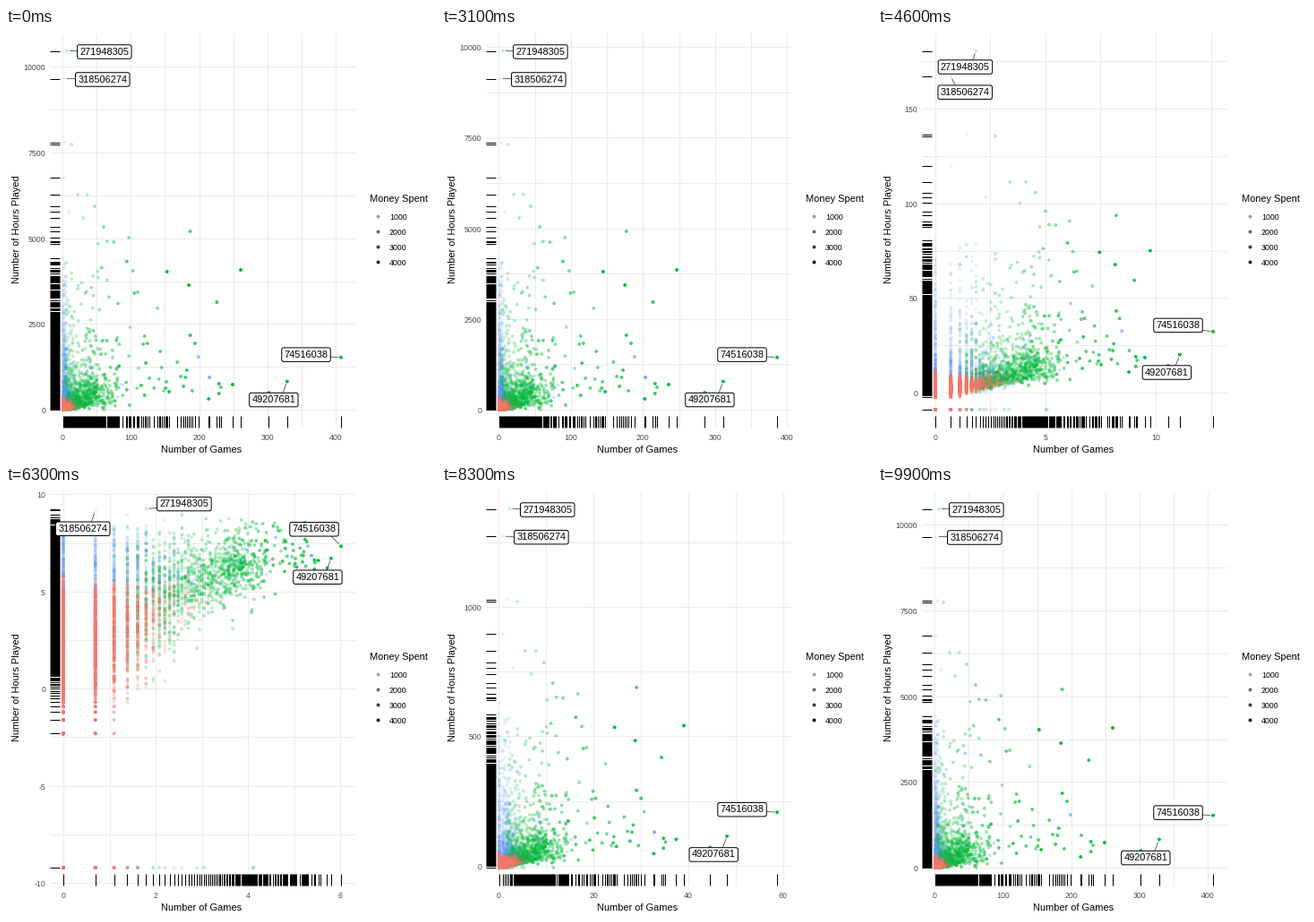
Animation, 480 px wide and 480 px high, one loop 10000 ms. Source, as a matplotlib script:

```python
import math

import matplotlib.pyplot as plt
import numpy as np
from matplotlib.animation import FuncAnimation
from matplotlib.collections import LineCollection

SIZE, FRAMES, STEP_MS = 480, 100, 100
PX = 0.75  # points per pixel at 96 dpi
LEFT, RIGHT, TOP, BOTTOM = 48.5, 389.5, 5.5, 446
PAD_X = (RIGHT - LEFT) * 0.05 / 1.1
PAD_Y = (BOTTOM - TOP) * 0.05 / 1.1
X0, X1 = LEFT + PAD_X, RIGHT - PAD_X
Y0, Y1 = BOTTOM - PAD_Y, TOP + PAD_Y
MAX_GAMES, MAX_HOURS = 408, 10470
RED, GREEN, BLUE = (0.973, 0.463, 0.427), (0, 0.729, 0.22), (0.38, 0.612, 1)

plt.rcParams["font.family"] = "Liberation Sans"
rng = np.random.default_rng(12)

# Labelled players: id, games, hours, label offsets (near raw, near log, log)
LABELS = [
    ("271948305", 6, 10470, (42, 1), (-12, 18), (42.5, -5.5)),
    ("318506274", 2, 9660, (43, 1), (16, 18), (-14, 20.5)),
    ("74516038", 408, 1525, (-39, -3), (-39, -7), (-30, -19)),
    ("49207681", 329, 821, (-15, 20.5), (-14.5, 20), (-15, 21)),
]

# Stand-out players, as positions on the raw chart
SPARSE_GREEN = [
    (206, 227), (262, 270), (235, 306), (204, 287), (180, 272), (142, 271),
    (137, 234), (109, 222), (147, 295), (143, 296), (169, 313), (206, 343),
    (211, 352), (253, 398), (238, 397), (240, 401), (238, 408), (226, 414),
    (208, 405), (200, 390), (202, 382), (191, 373), (172, 361), (174, 379),
    (155, 344), (158, 352), (153, 353), (171, 392), (179, 395), (195, 389),
    (178, 402), (182, 406), (176, 405), (198, 400), (293, 407), (156, 374),
    (160, 391), (165, 402), (151, 399), (148, 380), (146, 402), (155, 410),
    (138, 421), (73, 130), (80, 186), (91, 186), (99, 199), (86, 212),
]
SPARSE_BLUE = [(215, 367), (227, 390), (66, 128), (65, 167), (70, 205), (139, 334)]


def crowd(n=4200):
    """Random players: games, hours and cluster (0 red, 1 green, 2 blue)."""
    log_g = 1.68 * rng.weibull(1.3, n)
    games = np.floor(np.exp(np.minimum(log_g, 4.6 * rng.uniform(0.75, 1, n))))
    lg = np.log(games)
    mean = 1.4 + 1.72 * lg - 0.12 * lg**2
    log_h = rng.normal(mean, np.maximum(0.85, 2.5 - 0.55 * lg))
    heavy = rng.random(n) < 0.11
    log_h[heavy] = rng.normal(6.9, 0.8, heavy.sum())
    log_h = np.minimum(log_h, 8.5 - np.abs(rng.normal(0, 0.25, n)))
    hours = np.maximum(np.round(np.exp(log_h), 1), 0.1)
    hours[rng.random(n) < 0.06 * np.exp(-0.8 * lg)] = 0
    green = rng.random(n) < np.clip((lg - 0.8) / 2.4, 0, 0.96)
    low = log_h < rng.normal(5.2, 0.5, n)
    return games, hours, np.where(green, 1, np.where(low, 0, 2))


def unproject(points):
    p = np.array(points, float)
    games = np.round(1 + (p[:, 0] - X0) / (X1 - X0) * (MAX_GAMES - 1))
    return games, (Y0 - p[:, 1]) / (Y0 - Y1) * MAX_HOURS


def players():
    games, hours, group = crowd()
    extra = [(*unproject(SPARSE_GREEN), 1), (*unproject(SPARSE_BLUE), 2)]
    extra += [([p[1]], [p[2]], c) for p, c in zip(LABELS, (1, 2, 1, 1))]
    for g, h, c in extra:
        games = np.append(games, g)
        hours = np.append(hours, h)
        group = np.append(group, np.full(len(g), c))
    money = 14 * games * rng.lognormal(0, 0.3, len(games)) + 250 * (group == 1)
    alpha = 0.1 + 0.9 * np.minimum(1, money / 4500)
    alpha[group == 0] = 0.14 + 0.25 / games[group == 0]
    rgba = np.column_stack([np.array([RED, GREEN, BLUE])[group], alpha])
    order = np.argsort(group == 0, kind="stable")
    return games[order], hours[order], rgba[order]


def breaks(lo, hi, m=5):
    """Extended Wilkinson axis breaks."""
    span, best, found = hi - lo, -9, (0, 1, 2)
    mag = math.floor(math.log10(span))
    for i, q in enumerate((1, 5, 2, 2.5, 4, 3)):
        for z in range(mag - 2, mag + 1):
            step = q * 10.0**z
            for k in range(2, 11):
                first = math.floor(hi / step) - k + 1
                for start in range(first, math.ceil(lo / step) + 1):
                    a, b = start * step, (start + k - 1) * step
                    simple = 1 - i / 5 - 1 + (a <= 0 <= b)
                    cover = 1 - 0.5 * ((hi - b) ** 2 + (lo - a) ** 2) / (0.1 * span) ** 2
                    ratio = (k - 1) / (b - a) * (max(b, hi) - min(a, lo)) / (m - 1)
                    dense = 2 - max(ratio, 1 / ratio)
                    score = 0.25 * simple + 0.2 * cover + 0.5 * dense + 0.05
                    if score > best:
                        best, found = score, (a, step, k)
    a, step, k = found
    ticks = a + step * np.arange(k)
    minor = a + step * (np.arange(k + 1) - 0.5)
    keep = lambda v: v[(v >= lo) & (v <= hi)]
    return keep(ticks), keep(minor), 0 if step == round(step) else 1


def raw_share(i):
    """Weight of the raw values against the log values."""
    def ease(p):
        return 4 * p**3 if p < 0.5 else 1 - 4 * (1 - p) ** 3
    if i < 25:
        return 1.0
    if i < 50:
        return 1 - ease((i - 25) / 25)
    return 0.0 if i < 75 else ease((i - 75) / 25)


class Scale:
    def __init__(self, lo, hi, p0, p1):
        self.lo, self.hi, self.p0, self.p1 = lo, hi, p0, p1

    def __call__(self, v):
        return self.p0 + (v - self.lo) / (self.hi - self.lo) * (self.p1 - self.p0)

    def breaks(self):
        pad = 0.05 * (self.hi - self.lo)
        return breaks(self.lo - pad, self.hi + pad)


fig = plt.figure(figsize=(5, 5), dpi=96, facecolor="white")
ax = fig.add_axes([0, 0, 1, 1])
ax.set(xlim=(0, SIZE), ylim=(SIZE, 0))
ax.axis("off")


def text(x, y, s="", size=11.0, **kw):
    kw = {"ha": "center", "va": "center_baseline", **kw}
    return ax.text(x, y, s, fontsize=size * PX, **kw)


def lines(color, width, z):
    return ax.add_collection(
        LineCollection([], colors=color, linewidths=width * PX, zorder=z, capstyle="butt"),
        autolim=False)


def dots(x, y, rgba, z):
    return ax.scatter(x, y, s=(2.9 * PX) ** 2, facecolors=rgba, edgecolors=rgba,
                      linewidths=PX, zorder=z)


games, hours, rgba = players()
log_games, log_hours = np.log(games), np.log(hours + 1e-4)

grid = lines("#EBEBEB", 1, 1)
cloud = dots(np.zeros(len(games)), np.zeros(len(games)), rgba, 2)
rug = lines("black", 1, 3)
leaders = lines("#444444", 0.8, 4)
x_ticks = [text(0, 457, size=8.8, color="#4D4D4D") for _ in range(12)]
y_ticks = [text(44, 0, size=8.8, color="#4D4D4D", ha="right") for _ in range(12)]
box = dict(boxstyle="round,pad=0.25,rounding_size=0.2", fc="white", ec="black", lw=PX)
tags = [text(0, 0, p[0], va="center", bbox=box, zorder=5) for p in LABELS]

text(218.5, 469.5, "Number of Games")
text(12, 225, "Number of Hours Played", rotation=90, va="center")
text(406, 189.5, "Money Spent", ha="left")
for n in range(4):
    y = 209.5 + 17.28 * n
    dots([414.6], [y], [(0, 0, 0, 0.29 + 0.21 * n)], 2)
    text(428, y + 0.5, str(1000 * (n + 1)), 8.8, ha="left")


def set_ticks(pool, values, digits, place):
    for n, t in enumerate(pool):
        t.set_visible(n < len(values))
        if n < len(values):
            t.set_text(f"{values[n] + 0.0:.{digits}f}")
            place(t, values[n])


def draw_labels(k, sx, sy):
    stage = 3 if k > 0.05 else 4 if k > 0.001 else 5
    segs = []
    for tag, p in zip(tags, LABELS):
        px = sx(k * p[1] + (1 - k) * math.log(p[1]))
        py = sy(k * p[2] + (1 - k) * math.log(p[2]))
        cx, cy = px + p[stage][0], py + p[stage][1]
        tag.set_position((cx, cy))
        half = 3.06 * len(p[0]) + 2.75
        tx = 0.4 * cx + 0.6 * min(max(px, cx - half), cx + half)
        ty = 0.4 * cy + 0.6 * min(max(py, cy - 8), cy + 8)
        d = math.hypot(tx - px, ty - py)
        segs.append([(px + 3 * (tx - px) / d, py + 3 * (ty - py) / d), (tx, ty)])
    leaders.set_segments(segs)


def draw(i):
    k = raw_share(i)
    gx = k * games + (1 - k) * log_games
    hy = k * hours + (1 - k) * log_hours
    sx = Scale(gx.min(), gx.max(), X0, X1)
    sy = Scale(hy.min(), hy.max(), Y0, Y1)
    px, py = sx(gx), sy(hy)
    cloud.set_offsets(np.column_stack([px, py]))

    rug_x, rug_y = np.unique(np.round(px)), np.unique(np.round(py))
    rug.set_segments([[(x, BOTTOM), (x, BOTTOM - 13.5)] for x in rug_x]
                     + [[(LEFT, y), (LEFT + 11, y)] for y in rug_y])

    xt, xm, xd = sx.breaks()
    yt, ym, yd = sy.breaks()
    grid.set_segments([[(x, TOP), (x, BOTTOM)] for x in sx(np.append(xt, xm))]
                      + [[(LEFT, y), (RIGHT, y)] for y in sy(np.append(yt, ym))])
    set_ticks(x_ticks, xt, xd, lambda t, v: t.set_x(sx(v)))
    set_ticks(y_ticks, yt, yd, lambda t, v: t.set_y(sy(v) + 0.5))
    draw_labels(k, sx, sy)
    return []


anim = FuncAnimation(fig, draw, frames=FRAMES, interval=STEP_MS,
                     init_func=lambda: [], repeat=True, repeat_delay=0)
plt.show()
```
